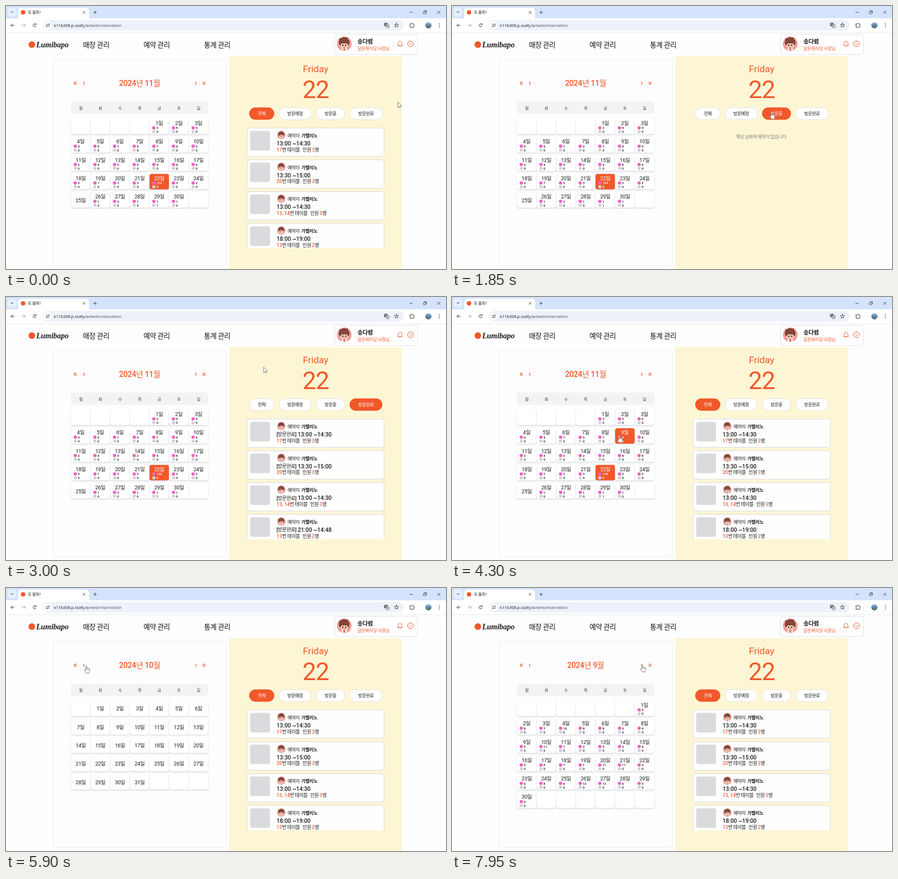
Write an HTML page with a canvas that moves like this. It is 800 by 477 pixels and loops after 8 s.

```html
<!DOCTYPE html>
<html lang="ko">
<head>
<meta charset="utf-8">
<title>예약 관리</title>
<style>
html, body { margin: 0; width: 100%; height: 100%; overflow: hidden; background: #fff; }
canvas { display: block; width: 800px; height: 477px; }
</style>
</head>
<body>
<canvas id="stage"></canvas>
<script>
const W = 800, H = 477, LOOP = 8000;
const canvas = document.getElementById('stage');
const ratio = window.devicePixelRatio || 1;
canvas.width = W * ratio;
canvas.height = H * ratio;
const ctx = canvas.getContext('2d');

const UI = 'Roboto, "Noto Sans CJK KR", "Noto Sans CJK", sans-serif';
const SYS = '"Noto Sans", "Noto Sans CJK KR", "Noto Sans CJK", sans-serif';
const SCRIPT = '"Liberation Serif", serif';
const ORANGE = '#f1582a', INK = '#1c1c1e';

// ---- state over time ----
const path = [
  [450, 712, 174], [850, 610, 222], [1250, 524, 197], [1450, 526, 196],
  [1720, 581, 192], [2100, 581, 192], [2350, 652, 196], [2500, 652, 196],
  [2950, 468, 127], [3050, 468, 127], [3700, 282, 319], [3980, 282, 319],
  [4250, 304, 251], [4650, 304, 251], [5000, 254, 205], [5100, 253, 205],
  [5600, 146, 141], [6820, 146, 141], [7280, 242, 162], [7800, 346, 139]
];
const tabSteps = [[0, 0], [1400, 1], [1760, 2], [2400, 3], [3900, 0]];
const monthSteps = [[0, 0], [5880, 1], [6560, 2]];
const loadedAt = [0, 6180, 7020];

const stepAt = (steps, t) => steps.filter(s => s[0] <= t).pop()[1];

function pointer(t) {
  const next = path.findIndex(p => p[0] > t);
  if (next === 0) return path[0].slice(1);
  if (next < 0) return path[path.length - 1].slice(1);
  const [t0, x0, y0] = path[next - 1], [t1, x1, y1] = path[next];
  const u = (t - t0) / (t1 - t0), e = u * u * (3 - 2 * u);
  return [x0 + (x1 - x0) * e, y0 + (y1 - y0) * e];
}

// ---- data ----
const months = [
  { title: '2024년 11월', first: 4, days: 30, picked: 22, done: { 29: 1 },
    counts: [3, 9, 4, 4, 5, 7, 9, 7, 9, 5, 3, 4, 5, 2, 4, 8, 9, 5, 7, 3, 3, 134, 3, 2, 0, 1, 3, 1, 1, 1] },
  { title: '2024년 10월', first: 1, days: 31, done: {},
    counts: Array.from({ length: 31 }, (_, i) => 3 + i * 7 % 9) },
  { title: '2024년 9월', first: 6, days: 30, done: {},
    counts: [5, 8, 7, 10, 8, 8, 5, 4, 9, 11, 7, 2, 9, 5, 4, 3, 6, 7, 1, 11, 11, 4, 6, 8, 6, 12, 13, 6, 9, 9] }
];
const pills = [['전체', 442.5, 45], ['방문예정', 496.5, 58.5], ['방문중', 564, 52], ['방문완료', 625, 59]];
const bookings = [
  ['13:00 ~14:30', '17', '3'], ['13:30 ~15:00', '20', '3'],
  ['13:00 ~14:30', '13, 14', '3'], ['18:00 ~19:00', '13', '2']
];
const GUEST = '가벨리노';
const COL = 35.7, ROW = 33.3, CAL_X = 118, CAL_Y = 205, CELL_H = 28;

// ---- drawing helpers ----
function text(s, x, y, size, o = {}) {
  const gap = (o.gap ?? (/[가-힣]/.test(s) ? -0.04 : 0)) * size;
  ctx.font = `${o.style || ''} ${o.weight || 400} ${size}px ${o.font || UI}`;
  ctx.letterSpacing = gap + 'px';
  ctx.textAlign = o.align || 'left';
  ctx.textBaseline = 'alphabetic';
  ctx.fillStyle = o.color || INK;
  ctx.fillText(s, x, y + size * 0.355);
  return ctx.measureText(s).width;
}
const center = (s, x, y, size, o = {}) => text(s, x, y, size, { ...o, align: 'center' });

function box(x, y, w, h, r, fill, stroke, line = 1) {
  ctx.beginPath();
  ctx.roundRect(x, y, w, h, r);
  if (fill) { ctx.fillStyle = fill; ctx.fill(); }
  if (stroke) { ctx.strokeStyle = stroke; ctx.lineWidth = line; ctx.stroke(); }
}
function dot(x, y, r, fill) {
  ctx.beginPath();
  ctx.arc(x, y, r, 0, 7);
  ctx.fillStyle = fill;
  ctx.fill();
}
function ring(x, y, r, color, line = 1, from = 0, to = Math.PI * 2) {
  ctx.beginPath();
  ctx.arc(x, y, r, from, to);
  ctx.strokeStyle = color;
  ctx.lineWidth = line;
  ctx.stroke();
}
function strokes(d, color, line = 1, x = 0, y = 0, fill) {
  ctx.save();
  ctx.translate(x, y);
  const p = new Path2D(d);
  if (fill) { ctx.fillStyle = fill; ctx.fill(p); }
  ctx.strokeStyle = color;
  ctx.lineWidth = line;
  ctx.lineCap = ctx.lineJoin = 'round';
  ctx.stroke(p);
  ctx.restore();
}
function shade(color, blur, dy) {
  ctx.shadowColor = color;
  ctx.shadowBlur = blur * ratio;
  ctx.shadowOffsetY = dy * ratio;
}
const noShade = () => shade('transparent', 0, 0);

function avatar(x, y, r) {
  ctx.save();
  ctx.translate(x, y);
  ctx.scale(r, r);
  dot(0, 0, 1, '#f39d97');
  ctx.beginPath();
  ctx.arc(0, 0, 1, 0, 7);
  ctx.clip();
  box(-0.42, 0.6, 0.84, 0.6, 0.2, '#f4e4e0');
  strokes('M-.1 .62L0 .95L.1 .62Z', '#c9503f', 0.08, 0, 0, '#c9503f');
  dot(-0.5, 0.2, 0.13, '#f3bfa8');
  dot(0.5, 0.2, 0.13, '#f3bfa8');
  box(-0.47, -0.3, 0.94, 0.96, 0.44, '#fad6c2');
  strokes('M-.56 .16C-.74-.1-.72-.4-.58-.5L-.62-.68L-.38-.66C-.2-.9 .1-.86 .22-.76L.44-.8L.46-.6C.72-.46 .72-.1 .56 .16L.42-.14L.2-.06L.16-.2L-.08-.04L-.14-.2L-.42-.04Z',
    '#6b352d', 0.09, 0, 0, '#84473a');
  dot(-0.2, 0.2, 0.1, '#3a2526');
  dot(0.2, 0.2, 0.1, '#3a2526');
  strokes('M-.1 .45Q0 .52 .1 .45', '#a84c42', 0.08);
  ctx.restore();
}

// ---- browser frame ----
function browser() {
  ctx.fillStyle = '#d4e3fb';
  ctx.fillRect(0, 0, W, 22.5);
  box(3, 3, 16, 16, 5, '#e6effd');
  strokes('M-2-1L0 1L2-1', '#333', 1, 11, 11);
  box(22, 3, 129, 25, 6, '#fff');
  ctx.fillStyle = '#fff';
  ctx.fillRect(0, 22.5, W, 26);
  dot(31, 11.5, 4, ORANGE);
  text('또 볼까?', 40, 11.5, 7, { font: SYS });
  strokes('M-2-2L2 2M2-2L-2 2', '#444', 0.9, 142, 11.5);
  strokes('M-2.7 0H2.7M0-2.7V2.7', '#444', 0.9, 162, 11.5);
  strokes('M-2.5 0H2.5', '#333', 0.8, 736.5, 11.5);
  box(759, 10, 4, 4, 0.5, null, '#333', 0.8);
  strokes('M760.5 8.5H764.5V12.5', '#333', 0.8);
  strokes('M-2.3-2.3L2.3 2.3M2.3-2.3L-2.3 2.3', '#333', 0.8, 787, 11.5);

  strokes('M3 0H-3M-.3-2.7L-3 0L-.3 2.7', '#444', 1, 12, 35);
  strokes('M-3 0H3M.3-2.7L3 0L.3 2.7', '#a3a5a8', 1, 32, 35);
  ring(52, 35, 2.8, '#444', 1, 0.4, 5.5);
  strokes('M55 31.5V34H52.5', '#444', 0.9);
  box(67, 25.5, 656, 19, 9.5, '#edf1fa');
  dot(76, 35, 7, '#fff');
  strokes('M-3-1.7H0M-.2 1.7H3', '#444', 0.9, 76, 35);
  ring(77.8, 33.3, 1.1, '#444', 0.9);
  ring(74.2, 36.7, 1.1, '#444', 0.9);
  const host = text('k11b308.p.ssafy.io', 87, 35, 7.4, { font: SYS, color: '#26282b' });
  text('/web/reservation', 87 + host, 35, 7.4, { font: SYS, color: '#50545a' });

  box(687.5, 30.5, 6, 6, 1, '#50545a');
  box(691.5, 33.5, 5, 6, 1, '#fff', '#50545a', 0.8);
  text('G', 688.4, 33.6, 5, { color: '#fff' });
  strokes('M692.8 35.5H695.2M694 35.5L693 38M694 35.5L695.2 38', '#50545a', 0.6);
  let star = '';
  for (let i = 0; i < 10; i++) {
    const r = i % 2 ? 1.7 : 4, a = i * Math.PI / 5;
    star += `${i ? 'L' : 'M'}${r * Math.sin(a)} ${-r * Math.cos(a)}`;
  }
  strokes(star + 'Z', '#444', 0.9, 710, 35);
  strokes('M-3.5-2.5H-1.2C-1.3-4.6 1.3-4.6 1.2-2.5H3.2V-.6C5-.7 5 1.7 3.2 1.6V3.6H-3.5V1.6C-1.6 1.4-1.6-.4-3.5-.6Z',
    '#444', 1, 738, 35);
  const sky = ctx.createLinearGradient(0, 29, 0, 41);
  sky.addColorStop(0, '#a9cbe8');
  sky.addColorStop(0.5, '#5b83a8');
  sky.addColorStop(1, '#5c705c');
  dot(768, 35, 5.7, sky);
  for (const dy of [-3, 0, 3]) dot(788, 35 + dy, 0.85, '#444');
  ctx.fillStyle = '#e3e6eb';
  ctx.fillRect(0, 48, W, 0.8);
}

function header() {
  dot(47, 70, 6, ORANGE);
  text('Lumibapo', 55, 70, 14, { font: SCRIPT, style: 'italic', weight: 700 });
  ['매장 관리', '예약 관리', '통계 관리'].forEach((s, i) =>
    text(s, 140 + i * 110, 70, 12.8, { weight: 500, color: '#111' }));
  box(597.5, 51.5, 151, 36.5, 4, '#fff', '#dfe2e8');
  avatar(615, 68.5, 13.3);
  text('송다렴', 639, 64, 10.5, { weight: 700 });
  text('달온재식당 사장님', 639, 77, 8, { color: ORANGE });
  strokes('M-4.5 3H4.5C3.2 1.5 3.4.3 3.3-1.2C3-5.6-3-5.6-3.3-1.2C-3.4.3-3.2 1.5-4.5 3ZM-1 5Q0 6 1 5', ORANGE, 1, 716.5, 68.5);
  ring(735.5, 68.5, 5.2, ORANGE);
  strokes('M-2.3-.8L0 1.4L2.3-.8', ORANGE, 1, 735.5, 68.5);
}

// ---- calendar ----
function dayAt(month, x, y) {
  const c = Math.floor((x - CAL_X) / COL), r = Math.floor((y - CAL_Y) / ROW);
  if (c < 0 || c > 6 || r < 0 || y - CAL_Y - r * ROW > CELL_H) return 0;
  const d = r * 7 + c - month.first + 1;
  return d >= 1 && d <= month.days ? d : 0;
}

function calendar(month, loaded, hover) {
  box(85.5, 97, 315, 374, 4, '#fdfdfe', '#e9ecf3');
  const arrow = { weight: 500, color: ORANGE };
  center('«', 126, 139, 14, arrow);
  center('‹', 141.5, 139, 14, arrow);
  center('›', 345, 139, 14, arrow);
  center('»', 360, 139, 14, arrow);
  center(month.title, 243, 140, 14.2, { color: ORANGE, weight: 500, gap: -0.025 });
  box(CAL_X, 173.5, 250, 22, 4, '#f3f3f4');
  [...'월화수목금토일'].forEach((s, i) =>
    center(s, CAL_X + (i + 0.5) * COL, 185, 7.3, { color: '#444' }));

  const total = Math.ceil((month.first + month.days) / 7) * 7;
  for (let i = 0; i < total; i++) {
    const x = CAL_X + i % 7 * COL, y = CAL_Y + Math.floor(i / 7) * ROW;
    const day = i - month.first + 1, real = day >= 1 && day <= month.days;
    const hot = real && (day === hover || day === month.picked);
    shade('rgba(40,40,70,.2)', 2.5, 1.2);
    box(x + 0.1, y - 0.4, COL - 0.2, CELL_H, 4, hot ? ORANGE : '#fff');
    noShade();
    if (!real) continue;
    const color = hot ? '#fff' : INK, count = month.counts[day - 1];
    const full = loaded && count > 0;
    center(day + '일', x + COL / 2, y + (full ? 7.5 : 14), 9.6, { color });
    if (!full) continue;
    const note = { color, weight: 500 };
    dot(x + 8, y + 16, 3, '#f062c1');
    dot(x + 8, y + 23, 3, '#d2d1d4');
    text(String(count), x + 12.6, y + 16.2, 6, note);
    text(String(month.done[day] || 0), x + 12.6, y + 23.2, 6, note);
  }
}

// ---- reservations ----
function card([time, table, people], y, done) {
  box(438.5, y + 0.5, 249, 51.5, 4, '#fefefe', '#dadae0');
  box(444, y + 5.7, 36, 35.5, 4, '#dbdadd');
  avatar(500.5, y + 13.5, 7.6);
  text('예약자', 512, y + 14.3, 8.3);
  text(GUEST, 537, y + 14.3, 8.3, { weight: 700 });
  let x = 492;
  if (done) x += text('[방문완료]', x, y + 28.5, 9, { weight: 500 }) + 2.5;
  text(time, x, y + 28.5, 10.3, { weight: 500 });
  x = 492;
  const run = (s, o) => { x += text(s, x, y + 40, 8.7, o); };
  const strong = { color: ORANGE, weight: 500 };
  run(table, strong);
  run('번 테이블');
  x += 5;
  run('인원 ');
  run(people, strong);
  run('명');
}

function panel(tab) {
  ctx.fillStyle = '#fdf6d5';
  ctx.fillRect(405.7, 91.3, 314.3, H - 91);
  center('Friday', 563, 114.3, 17.3, { color: ORANGE });
  center('22', 563, 151, 44.5, { color: ORANGE, gap: -0.02 });
  pills.forEach(([label, x, w], i) => {
    const on = i === tab;
    box(x, 184.3, w, 21.6, 10.8, on ? ORANGE : '#fff', on ? ORANGE : '#dcdcdc', 0.8);
    center(label, x + w / 2, 195.2, 8.1, { color: on ? '#fff' : INK, weight: 500 });
  });
  if (tab === 2) {
    center('해당 날짜에 예약이 없습니다.', 563, 237.5, 8.2, { color: '#85837c' });
    return;
  }
  ctx.save();
  ctx.beginPath();
  ctx.rect(430, 215, 270, 224.5);
  ctx.clip();
  bookings.forEach((b, i) => {
    const done = tab === 3;
    card(done && i === 3 ? ['21:00 ~14:48', b[1], b[2]] : b, 220.7 + i * 57.7, done);
  });
  ctx.restore();
}

// ---- pointer ----
function drawPointer(x, y, hand) {
  if (hand) {
    strokes('M-1 1C-1-.4 1-.4 1 1V4.8C1.8 4.2 2.6 4.5 2.8 5.1C3.6 4.6 4.4 5 4.5 5.7C5.4 5.3 6 5.9 6 6.8V9.4C6 11.2 5 12 4.8 13.2H-.2C-.6 11.6-2.3 10-3.2 8.2C-3.6 7-2.4 6.6-1 8.2Z',
      '#55565c', 0.75, x, y, '#fff');
    strokes('M1 4.8V6.8M2.8 5.3V7M4.5 5.9V7.3', '#55565c', 0.5, x, y);
  } else {
    strokes('M.4.4V10L2.6 8L4 11.2L5.5 10.5L4.1 7.4H7Z', '#66676d', 0.8, x, y, '#fff');
  }
}

function draw(t) {
  const m = stepAt(monthSteps, t), month = months[m], tab = stepAt(tabSteps, t);
  const [x, y] = pointer(t);
  const hover = dayAt(month, x, y);
  const overPill = y > 184 && y < 206 && pills.some(p => x > p[1] && x < p[1] + p[2]);
  const overArrow = y > 131 && y < 149 && (x > 119 && x < 151 || x > 339 && x < 367);
  ctx.setTransform(ratio, 0, 0, ratio, 0, 0);
  ctx.fillStyle = '#fefefe';
  ctx.fillRect(0, 0, W, H);
  browser();
  header();
  calendar(month, t >= loadedAt[m], hover);
  panel(tab);
  drawPointer(x, y, hover || overPill || overArrow);
}

const start = performance.now();
function tick() {
  draw((performance.now() - start) % LOOP);
  requestAnimationFrame(tick);
}
tick();
</script>
</body>
</html>
```
